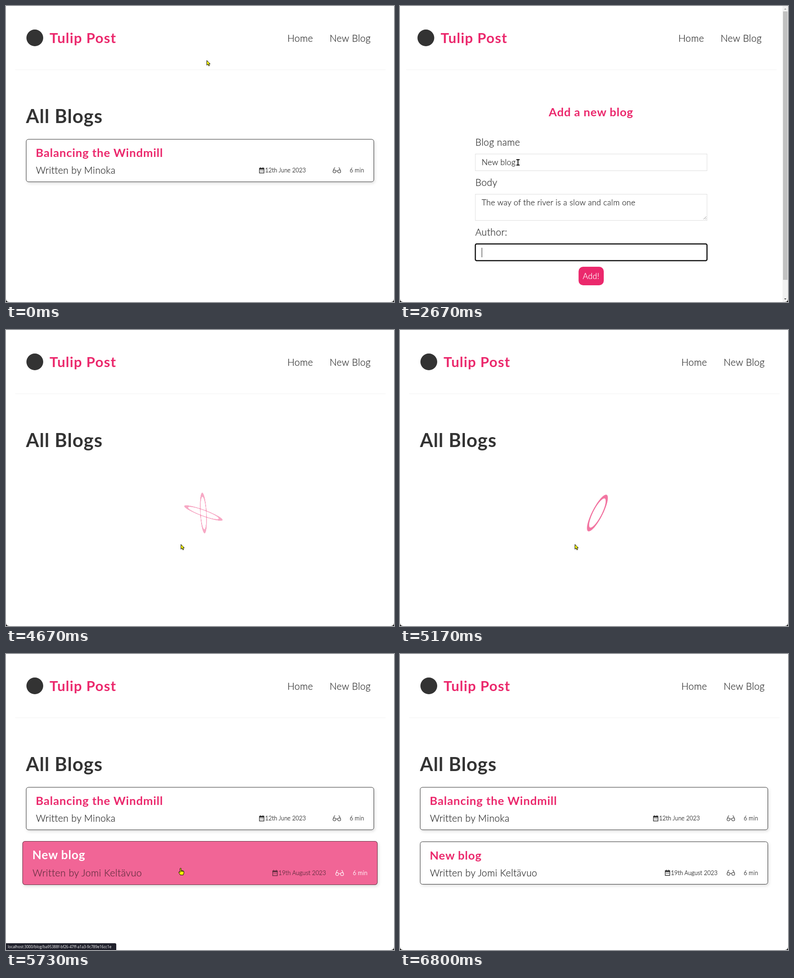
Animation of 855x655 px, one loop 7.06 s. Source, as an HTML page:

```html
<!DOCTYPE html>
<html lang="en">
<head>
<meta charset="utf-8">
<title>Blog demo</title>
<style>
  :root { --pink: #eb286c; }
  html, body { margin: 0; width: 100%; height: 100%; overflow: hidden; background: #fff; }
  svg { position: absolute; left: 0; top: 0; color: #333; }
  text { font: 300 21px Lato, "Open Sans", sans-serif; letter-spacing: .35px; white-space: pre;
    fill: currentColor; stroke: currentColor; stroke-width: .3px; }
  .logo, .h1, .h2, .url { stroke: none; }
  .logo { font-size: 31px; font-weight: 700; letter-spacing: 1.2px; fill: var(--pink); }
  .h1 { font-size: 41.5px; font-weight: 700; letter-spacing: .95px; }
  .h2 { font-size: 25.6px; font-weight: 700; letter-spacing: .8px; fill: var(--pink); }
  .small { font-size: 12.8px; letter-spacing: .1px; }
  .input { font-size: 17.6px; letter-spacing: .3px; }
  .url { font: 8.2px "Open Sans", sans-serif; letter-spacing: 0; fill: #fff; }
  .box { fill: #fff; stroke: currentColor; filter: drop-shadow(2px 3px 3px rgba(0, 0, 0, .13)); }
  .line { fill: none; stroke: currentColor; }
  .hover .h2 { fill: #fff; }
  .hover .time, .button { color: #fff; }
  .ring { position: absolute; left: 390px; top: 359.5px; width: 90px; height: 90px; box-sizing: border-box;
    border: 9px solid var(--pink); border-radius: 50%; opacity: .4; }
</style>
</head>
<body>
<svg id="stage" width="855" height="655" viewBox="0 0 855 655">
  <g id="header">
    <circle cx="63.5" cy="70.5" r="18.5" fill="#333"/>
    <text class="logo" x="96" y="82">Tulip Post</text>
    <text x="620" y="79">Home</text>
    <text x="713" y="79">New Blog</text>
    <path d="M20 141H836.500" stroke="#f2f2f2"/>
  </g>
  <g id="home">
    <text class="h1" x="44" y="259">All Blogs</text>
  </g>
  <g id="form">
    <text class="h2" x="421" y="244" text-anchor="middle">Add a new blog</text>
    <g id="fields"></g>
    <path d="M669 472l6-6M673 472l2-2" stroke="#888"/>
    <rect x="393.500" y="577" width="55.500" height="41" rx="10" fill="var(--pink)"/>
    <text class="input button" x="421" y="604" text-anchor="middle">Add!</text>
    <path d="M843 0H855V655H843z" fill="#f1f1f1"/>
    <path d="M844 12H854V606H844z" fill="#c1c1c1"/>
    <path d="M846.500 8l2.500-3 2.500 3z" fill="#a3a3a3"/>
    <path d="M846.500 647l2.500 3 2.500-3z" fill="#505050"/>
  </g>
  <path d="M0 648Q0 655 7 655H0zM855 648Q855 655 848 655H855z" fill="#111"/>
  <g id="status">
    <path d="M0 640H240Q243 640 243 643V655H0z" fill="#20212c"/>
    <text class="url" x="4" y="651">localhost:3000/blog/ba95388f-bf26-47ff-a1a3-9c789e16cc1e</text>
  </g>
</svg>
<div id="spinner"><div class="ring"></div><div class="ring"></div></div>
<svg width="855" height="655" viewBox="0 0 855 655">
  <g id="mouse" stroke-linejoin="round">
    <path id="arrow" d="M.5 .5V11l2.400-2.200 1.900 3.900 1.700-.8-1.800-3.700H8z" fill="#ff0" stroke="#000"/>
    <path id="hand" d="M-1.500 .5Q0-.8 1 .5V5l5 1Q7 6.500 7 8V11L5.500 15H-1L-4.500 9.500Q-4.500 7.500-3 8L-1.500 9.500zM1 5V8M3 5.500V8M5 6V8" fill="#ff0" stroke="#000"/>
    <path id="beam" d="M-3.500-6H-1L0-5 1-6H3.500M0-5V5M-3.500 6H-1L0 5 1 6H3.500" fill="none" stroke="#000" stroke-width="1.800"/>
  </g>
</svg>
<script>
const LOOP = 7060;
const FORM_AT = 620, SUBMIT_AT = 3440, LOADED_AT = 5600;
const $ = id => document.getElementById(id);
const show = (el, on) => { el.style.display = on ? '' : 'none'; };

// Piecewise linear value through [time, value] points.
function track(t, points) {
  const i = points.findIndex(p => p[0] > t);
  if (i === 0) return points[0][1];
  if (i < 0) return points[points.length - 1][1];
  const [t0, a] = points[i - 1], [t1, b] = points[i];
  return a + (b - a) * (t - t0) / (t1 - t0);
}

function addCard(y, title, author, date, dateX) {
  const g = document.createElementNS('http://www.w3.org/2000/svg', 'g');
  g.innerHTML = `
    <rect class="box" x="44.5" y="${y}" width="766" height="94" rx="5"/>
    <g transform="translate(0 ${y - 295})">
      <text class="h2" x="65.500" y="334">${title}</text>
      <text x="66" y="371">Written by ${author}</text>
      <g transform="translate(${dateX} 357)">
        <path class="line" stroke-width="1.400" d="M1.500 2H11.500V12.500H1.500z"/>
        <path fill="currentColor" d="M1 2H12V5H1zM3 0H4.500V2H3zM8.500 0H10V2H8.500zM3.500 7H5V8.500H3.500zM6 7H7.500V8.500H6zM8.500 7H10V8.500H8.500z"/>
        <text class="small" x="14" y="11">${date}</text>
      </g>
      <g class="time">
        <path class="line" stroke-width="1.100" d="M720.500 366a3.300 3.300 0 1 0 6.600 0a3.300 3.300 0 1 0-6.600 0M731 366a3.300 3.300 0 1 0 6.600 0a3.300 3.300 0 1 0-6.600 0M727 365.500q2-1.500 4 0M720.500 366L723.500 358.500q.7-1 1.800-.2M737.600 366L734.600 358.500q-.7-1-1.800-.2"/>
        <text class="small" x="757.500" y="368">6 min</text>
      </g>
    </g>`;
  $('home').append(g);
  return g;
}

const cards = [
  addCard(295, 'Balancing the Windmill', 'Minoka', '12th June 2023', 557),
  addCard(415.5, 'New blog', 'Jomi Keltävuo', '19th August 2023', 583)
];

const fields = [
  { label: 'Blog name', y: 327, h: 37, text: 'New blog', focus: [760, 1130],
    typed: [[790, 0], [1050, 8]] },
  { label: 'Body', y: 416, h: 58, text: 'The way of the river is a slow and calm one', focus: [1130, 2670],
    typed: [[1160, 0], [1370, 7], [1830, 21], [1900, 21], [2600, 43]] },
  { label: 'Author:', y: 526, h: 37, text: 'Jomi Keltävuo', focus: [2670, SUBMIT_AT],
    typed: [[2690, 0], [3060, 13]] }
];
$('fields').innerHTML = fields.map(f => `
  <g>
    <text x="166" y="${f.y - 18}">${f.label}</text>
    <rect x="166" y="${f.y + .5}" width="510.500" height="${f.h}" fill="#fff"/>
    <text class="input" x="180" y="${f.y + 25}"></text>
    <path stroke="#222"/>
  </g>`).join('');
fields.forEach((f, i) => {
  const g = $('fields').children[i];
  [, f.rect, f.input, f.caret] = g.children;
});

function drawField(f, t) {
  const focused = t >= f.focus[0] && t < f.focus[1];
  f.rect.setAttribute('stroke', focused ? '#111' : '#ddd');
  f.rect.setAttribute('stroke-width', focused ? 2.5 : 1);
  f.rect.setAttribute('rx', focused ? 3 : 0);
  f.input.textContent = f.text.slice(0, Math.floor(track(t, f.typed) + .01));
  const x = Math.round(180 + f.input.getComputedTextLength()) + .5;
  f.caret.setAttribute('d', `M${x} ${f.y + 9}v21`);
  show(f.caret, focused);
}

const mouseX = [[400, 442], [560, 757], [640, 757], [760, 260], [3080, 260], [3350, 415],
  [3440, 415], [3600, 385], [6200, 385], [6340, 335], [6400, 261], [6470, 180]];
const mouseY = [[400, 120], [560, 75], [640, 75], [760, 346], [3080, 346], [3350, 591],
  [3440, 591], [3600, 474], [6200, 474], [6340, 515], [6400, 589], [6470, 670]];
const cursors = [[0, 'arrow'], [540, 'hand'], [650, 'arrow'], [740, 'beam'], [3100, 'arrow'],
  [3340, 'hand'], [3480, 'arrow'], [5570, 'hand'], [6340, 'arrow']];
const hoverFade = [[5570, 0], [5600, .08], [5690, .6], [5830, 1],
  [6340, 1], [6400, .78], [6460, .3], [6580, 0]];

function drawMouse(t) {
  $('mouse').setAttribute('transform', `translate(${track(t, mouseX)} ${track(t, mouseY)})`);
  const current = cursors.filter(c => c[0] <= t).pop()[1];
  for (const id of ['arrow', 'hand', 'beam']) show($(id), id === current);
}

function drawHover(t) {
  const p = track(t, hoverFade), card = cards[1];
  card.classList.toggle('hover', t >= LOADED_AT && t < 6340);
  card.setAttribute('transform', `translate(427.5 462.5) scale(${1 + .0285 * p}) translate(-427.5 -462.5)`);
  card.style.color = `color-mix(in srgb, var(--pink) ${p * 40}%, #333)`;
  card.firstElementChild.style.fill = `color-mix(in srgb, var(--pink) ${p * 100}%, #fff)`;
}

// Two rings tumble with the slow and fast axes swapped.
function drawSpinner(t) {
  const turn = ((t - 3700) / 898 + 1.03) % 1;
  const slow = turn * 180, fast = turn * 720;
  const [a, b] = $('spinner').children;
  a.style.transform = `rotateX(${slow}deg) rotateY(${fast}deg)`;
  b.style.transform = `rotateX(${fast}deg) rotateY(${slow}deg)`;
}

function draw(now) {
  const t = now % LOOP;
  const onForm = t >= FORM_AT && t < SUBMIT_AT;
  const loading = t >= SUBMIT_AT && t < LOADED_AT;
  show($('home'), !onForm);
  show($('form'), onForm);
  show($('spinner'), loading);
  show(cards[0], !loading);
  show(cards[1], t >= LOADED_AT);
  show($('status'), t >= 5700 && t < 6640);
  $('header').setAttribute('transform', `translate(${onForm ? -6.5 : 0} 0)`);
  if (onForm) fields.forEach(f => drawField(f, t));
  if (loading) drawSpinner(t);
  drawHover(t);
  drawMouse(t);
  requestAnimationFrame(draw);
}
requestAnimationFrame(draw);
</script>
</body>
</html>
```
